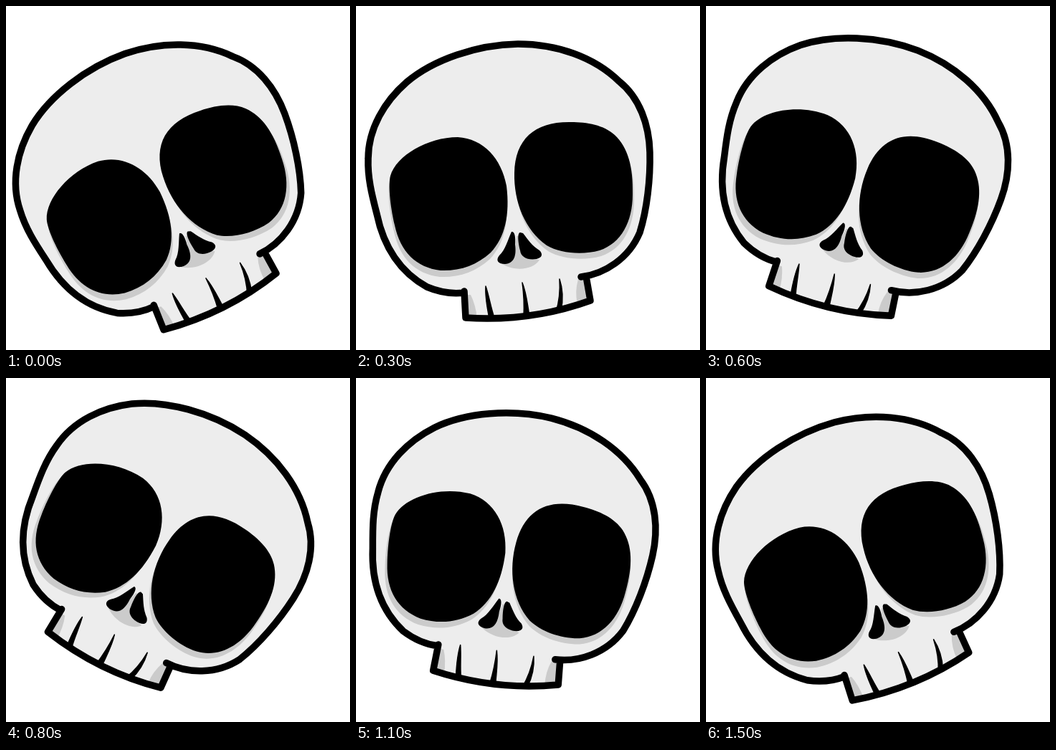
Recreate the animation shown at these times as an HTML page. Size 480x480 px, loop 1.6 s.

```html
<!DOCTYPE html>
<html lang="en">
<head>
<meta charset="utf-8">
<title>Rocking skull</title>
<style>
  html, body { margin: 0; height: 100%; overflow: hidden; background: #fff; }
  svg { display: block; width: 100vw; height: 100vh; }
</style>
</head>
<body>
<svg viewBox="0 -1 480 480">
  <defs>
    <path id="bone" d="M314 377C347 373 381 351 396 315C406 283 411 240 410 203C409 165 396 127 367 104C332 70 280 52 226 52C168 53 108 74 71 105C40 132 17 170 17 212C16 238 22 262 29 289C39 337 63 371 99 391C118 399 135 401 151 399
      M151 397L153 434Q244 440 327 410L321 376"/>
    <path id="leftEye" d="M142 182C178 184 203 212 210 250C215 290 208 322 188 343C168 361 145 369 118 368C84 364 62 342 54 305C47 275 45 247 48 236C56 208 100 182 142 182Z"/>
    <path id="rightEye" d="M300 161C250 160 222 184 221 232C220 272 236 312 266 333C285 344 315 347 340 340C370 330 386 300 386 262C387 222 379 196 361 179C346 165 322 161 300 161Z"/>
  </defs>
  <g id="skull">
    <use href="#bone" fill="#ededed"/>
    <g fill="#cbcbcb">
      <use href="#leftEye" x="-1" y="9"/>
      <use href="#rightEye" x="2" y="8"/>
      <path d="M224 320C222 340 218 350 204 359C222 370 248 367 256 353L236 350Q228 340 227 320Z"/>
      <path d="M151 402H160Q167 416 169 435H154Z"/>
      <path d="M322 380H310Q305 398 309 415L328 408Z"/>
    </g>
    <use href="#bone" fill="none" stroke="#000" stroke-width="9.5" stroke-linecap="round" stroke-linejoin="round"/>
    <use href="#leftEye"/>
    <use href="#rightEye"/>
    <path d="M217 314C221 313 223 320 222 332C224 347 221 358 208 359C197 359 195 353 200 347C208 340 212 325 217 314Z"/>
    <path d="M229 315C225 316 226 328 229 340C230 350 240 354 252 352C260 350 261 345 256 340C246 334 240 325 233 316Z"/>
    <path stroke="#000" stroke-width="1.5" stroke-linejoin="round" d="M181 390C180 405 183 420 186 435L193 434C188 420 186 405 181 390Z
      M232 385C234 400 235 415 234 432L242 431C239 415 238 400 232 385Z
      M284 380C285 395 284 410 279 426L286 424C289 410 289 395 284 380Z"/>
  </g>
</svg>
<script>
  const STEP = 100;
  const DRAWN_TILT = -7.7;
  // Half a swing, left to right; the way back mirrors it.
  const tilts = [-26.5, -22.2, -15, -7.7, -0.5, 6.6, 13.8, 20.8, 26.5];
  const last = tilts.length - 1;
  const skull = document.getElementById("skull");

  function draw(now) {
    const step = Math.floor(now / STEP) % (2 * last);
    const tilt = tilts[last - Math.abs(last - step)];
    skull.setAttribute("transform", `rotate(${tilt - DRAWN_TILT} 237 240)`);
    requestAnimationFrame(draw);
  }
  draw(performance.now());
</script>
</body>
</html>
```
